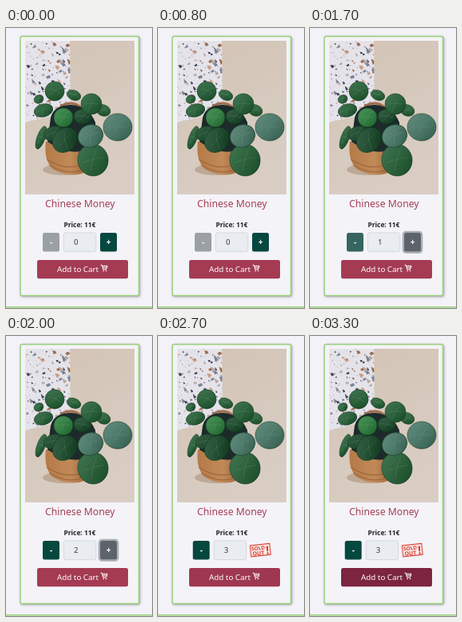
An HTML page for the animation above (3.4 s loop, 183 px wide and 350 px high).

```html
<!DOCTYPE html>
<html lang="en">
<head>
<meta charset="utf-8">
<title>Plant card</title>
<style>
  html, body { margin: 0; width: 100%; height: 100%; overflow: hidden; background: #f3f2f8; }
  svg { display: block; width: 100vw; height: 100vh; }
  text { font-family: "Noto Sans", "Open Sans", sans-serif; }
  .mid { text-anchor: middle; }
  .card { filter: drop-shadow(1px 1.5px 1.5px #0005); }
  .sign { fill: #fff; font-size: 10px; font-weight: 600; text-anchor: middle; }
  .stamp text { fill: #d83a2c; font-weight: 900; }
</style>
</head>
<body>
<svg viewBox="0 0 183 350">
  <defs>
    <linearGradient id="wall" x2=".4" y2="1">
      <stop stop-color="#d2c3b4"/><stop offset="1" stop-color="#d9cdc3"/>
    </linearGradient>
    <linearGradient id="pot">
      <stop stop-color="#b57a48"/><stop offset=".5" stop-color="#c08a58"/><stop offset="1" stop-color="#8a5230"/>
    </linearGradient>
    <linearGradient id="sheen" x2="1" y2="1">
      <stop stop-color="#bcd8c8" stop-opacity=".22"/><stop offset="1" stop-color="#001a08" stop-opacity=".3"/>
    </linearGradient>
    <clipPath id="frame"><rect x="24" y="16" width="137" height="192"/></clipPath>
    <clipPath id="panel"><path d="M24 16H80L81 104 24 118Z"/></clipPath>
  </defs>

  <rect class="card" x="18" y="10.5" width="148.5" height="324" rx="2" fill="#f4f3f8" stroke="#98d07a" stroke-width="1.4"/>
  <path d="M0 348.7H183" stroke="#98d07a" stroke-width="1.4"/>

  <g clip-path="url(#frame)">
    <rect x="24" y="16" width="137" height="192" fill="url(#wall)"/>
    <g id="chips" clip-path="url(#panel)"><rect x="24" y="16" width="60" height="104" fill="#e4e3ea"/></g>
    <ellipse cx="73" cy="177" rx="27" ry="7" fill="#bda997"/>
    <path d="M50 142Q47 164 58 176Q82 190 105 178Q115 166 112 142Z" fill="url(#pot)"/>
    <path d="M51 164Q80 184 112 163M54 171Q82 189 109 171" fill="none" stroke="#9b5e36"/>
    <path d="M68 98Q82 89 95 100" fill="none" stroke="#a06c4c" stroke-width="3"/>
    <path d="M56 112Q60 96 82 96Q104 98 112 118L112 148Q82 164 52 142Z" fill="#1c2b2a"/>
    <g id="leaves"></g>
  </g>

  <text class="mid" x="92.8" y="224.4" font-size="12.2" font-weight="500" fill="#a53f56">Chinese Money</text>
  <text class="mid" x="92.4" y="248.5" font-size="8.4" font-weight="600" fill="#212529">Price: 11€</text>

  <g id="left">
    <rect id="minus" x="46" y="256" width="21" height="23.5" rx="2.5"/>
    <text class="sign" x="56.7" y="271">-</text>
    <rect x="72.4" y="255.9" width="40.4" height="23.7" rx="2.5" fill="#e9ecf0" stroke="#ced4da" stroke-width=".8"/>
    <text id="count" x="85" y="271.3" font-size="9.6" fill="#343a40"></text>
  </g>
  <g id="right">
    <rect id="ring" x="116.8" y="254.8" width="23.4" height="25.9" rx="3.5" fill="none" stroke="#a9adb3" stroke-width="2.2"/>
    <rect id="plus" x="118" y="256" width="21" height="23.5" rx="2.5"/>
    <text class="sign" x="128.5" y="271.3">+</text>
  </g>
  <g id="sold" class="stamp" transform="rotate(-6 128.5 267.5)">
    <rect x="116" y="260.6" width="24.6" height="14" fill="#f8e9ea" stroke="#d83a2c"/>
    <text x="117.3" y="267.2" font-size="6.4">SOLD</text>
    <text x="118" y="273.8" font-size="7">OUT</text>
    <text x="135.2" y="273.6" font-size="14">!</text>
  </g>

  <rect id="add" x="39" y="290" width="114" height="23.3" rx="2.5"/>
  <text x="64" y="304.9" font-size="9.8" fill="#fff">Add to Cart</text>
  <g fill="none" stroke="#fff">
    <path d="M118.6 296.2H120.2L121.6 301.4H125.8L127 297.4H120.6M121.2 299.3H126.4" stroke-width="1"/>
    <path d="M122.2 303.4h.1M125.4 303.4h.1" stroke-width="1.6" stroke-linecap="round"/>
  </g>
</svg>
<script>
const $ = id => document.getElementById(id);
const LOOP = 3400, FADE = 150;
const HOVER = 1050, CLICKS = [1600, 1900, 2300], ADD = 2680;

function draw(parent, tag, attrs) {
  const el = document.createElementNS("http://www.w3.org/2000/svg", tag);
  for (const key in attrs) el.setAttribute(key, attrs[key]);
  parent.append(el);
}

// Terrazzo chips, spread over a jittered grid
let seed = 11;
const rnd = () => (seed = seed * 16807 % 2147483647) / 2147483647;
const chipColors = ["#9c6a4c", "#3c4258", "#b9aaa6", "#7b8296", "#c9a08c"];
for (let i = 0; i < 160; i++) {
  const x = 22 + (i % 10 + rnd()) * 6, y = 16 + (Math.floor(i / 10) + rnd()) * 6.4;
  const s = .8 + rnd() ** 2 * 3.6, lean = rnd() * 2 - 1;
  draw($("chips"), "path", {
    d: `M${x} ${y}l${s} ${s * lean} ${s * .5} ${s * .7} ${-s} ${s * .5}z`,
    fill: chipColors[Math.floor(rnd() * 5)]
  });
}

// Leaves: x, y, rx, ry, tilt, shade
const greens = ["#0f3f20", "#1c5a2e", "#268038", "#47786a"];
[
  [41, 89, 6, 5, -25, 1], [122, 103, 9, 7, 20, 1], [96, 111, 11, 9, 10, 0],
  [47, 103, 12, 8, -15, 1], [44, 137, 5, 15, 20, 1], [61, 79, 12, 12, 25, 1],
  [85, 84, 9, 6, 20, 1], [107, 95, 13, 13, 0, 1], [72, 112, 12, 12, 0, 2],
  [60, 132, 13, 9, -12, 0], [74, 140, 17, 14, -45, 0],
  [109, 165, 19, 20, -15, 1], [106, 135, 16, 14, -25, 3], [140, 124, 18, 17, 0, 3]
].forEach(([x, y, rx, ry, tilt, shade]) => {
  const transform = `translate(${x} ${y}) rotate(${tilt})`;
  draw($("leaves"), "ellipse", { rx, ry, transform, fill: greens[shade], stroke: "#0e331d", "stroke-width": .6 });
  draw($("leaves"), "ellipse", { rx, ry, transform, fill: "url(#sheen)" });
  draw($("leaves"), "path", {
    d: `M${-rx * .7} 0Q0 -2 ${rx * .7} 0M0 -1L${rx * .4} ${-ry * .6}M0 -1L${-rx * .3} ${ry * .6}`,
    transform, fill: "none", stroke: "#80ad88", "stroke-width": .5, opacity: .4
  });
});

const fade = (t, start, from, to) => {
  const k = Math.max(0, Math.min(1, (t - start) / FADE));
  return `rgb(${from.map((c, i) => Math.round(c + (to[i] - c) * k))})`;
};
const show = (id, on) => $(id).setAttribute("visibility", on ? "visible" : "hidden");

const teal = [5, 72, 64], gray = [154, 160, 166], slate = [92, 99, 106];
const rose = [164, 59, 83], wine = [124, 36, 64];

function frame(now) {
  const t = now % LOOP;
  const count = CLICKS.filter(c => t >= c).length;
  const sold = count === 3;
  $("count").textContent = count;
  $("left").setAttribute("transform", `translate(${sold ? -2.3 : 0})`);
  $("minus").setAttribute("fill", fade(t, CLICKS[0], gray, teal));
  $("plus").setAttribute("fill", fade(t, HOVER, teal, slate));
  $("add").setAttribute("fill", fade(t, ADD, rose, wine));
  show("right", !sold);
  show("sold", sold);
  $("ring").setAttribute("opacity", count && !sold ? 1 : 0);
  requestAnimationFrame(frame);
}
requestAnimationFrame(frame);
</script>
</body>
</html>
```
